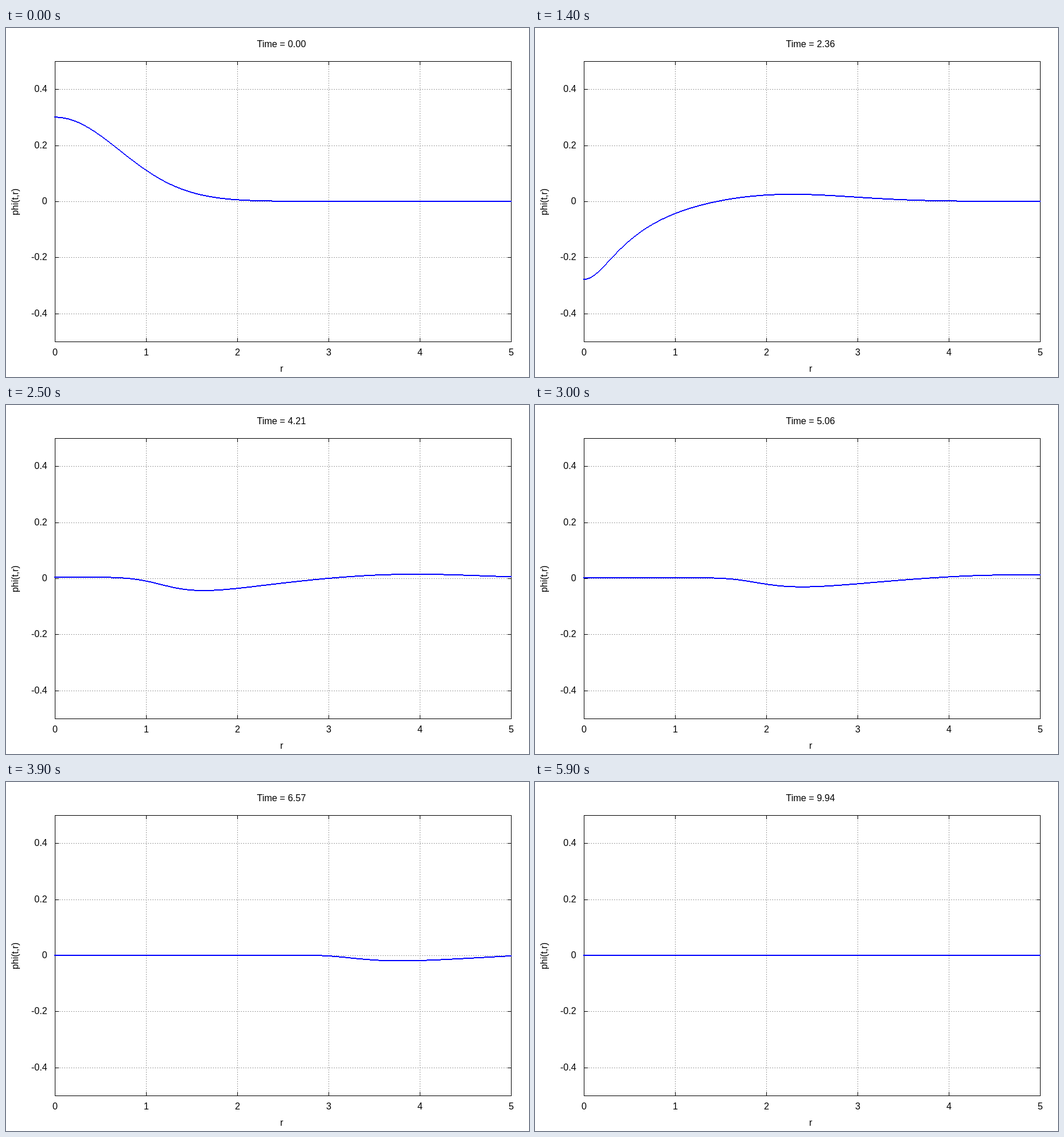
Write an HTML page with a canvas that moves like this. It is 900 by 600 pixels and loops after 6000 ms.

```html
<!DOCTYPE html>
<html lang="en">
<head>
<meta charset="utf-8">
<title>Scalar pulse</title>
<style>
  html, body { margin: 0; width: 100%; height: 100%; overflow: hidden; background: #fff; }
  canvas { display: block; }
</style>
</head>
<body>
<canvas id="plot" width="900" height="600"></canvas>
<script>
// Self-gravitating spherical scalar field in polar-areal coordinates.
const N = 1000, DR = 0.01;
const FRAMES = 60, FRAME_MS = 100, FRAME_T = 0.168505, SUBSTEPS = 34;
const VISIBLE = 510;

const mass = new Float64Array(N + 1);
const source = new Float64Array(N);

// y holds phi in its first half and the momentum Pi in its second half.
function rates(y, out) {
  let left = 0;
  for (let i = 0; i < N; i++) {
    const r = (i + 0.5) * DR;
    const right = i < N - 1 ? (y[i + 1] - y[i]) / DR : 0;
    const slope = (left + right) / 2, pi = y[N + i];
    const k = 2 * Math.PI * r * DR * (slope * slope + pi * pi);
    source[i] = k;
    mass[i + 1] = (mass[i] * (1 - k) + k * r) / (1 + k);
    left = right;
  }
  let outerE = 1, outerFlux = 0;
  for (let i = N - 1; i >= 0; i--) {
    const e = outerE * Math.exp(-2 * source[i]);
    const r = (i + 0.5) * DR;
    const speed = (e + outerE) / 2 * (1 - (mass[i] + mass[i + 1]) / r);
    const flux = i ? i * i * e * (1 - 2 * mass[i] / (i * DR)) * (y[i] - y[i - 1]) : 0;
    out[i] = speed * y[N + i];
    out[N + i] = 3 * (outerFlux - flux) / (DR * DR * (3 * i * (i + 1) + 1));
    outerE = e;
    outerFlux = flux;
  }
}

function evolve() {
  const make = () => new Float64Array(2 * N);
  const y = make(), trial = make(), sum = make(), k = make();
  const h = FRAME_T / SUBSTEPS;
  const weight = [1, 2, 2, 1], reach = [0.5, 0.5, 1, 0];
  for (let i = 0; i < N; i++) y[i] = 0.3 * Math.exp(-(((i + 0.5) * DR) ** 2));

  const curves = [y.slice(0, VISIBLE)];
  while (curves.length < FRAMES) {
    for (let s = 0; s < SUBSTEPS; s++) {
      trial.set(y);
      sum.fill(0);
      for (let stage = 0; stage < 4; stage++) {
        rates(trial, k);
        const w = weight[stage], a = reach[stage] * h;
        for (let j = 0; j < 2 * N; j++) {
          sum[j] += w * k[j];
          trial[j] = y[j] + a * k[j];
        }
      }
      for (let j = 0; j < 2 * N; j++) y[j] += h / 6 * sum[j];
    }
    curves.push(y.slice(0, VISIBLE));
  }
  return curves;
}

const LEFT = 84, RIGHT = 869, TOP = 57, BOTTOM = 539;
const xOf = r => Math.round(LEFT + 157 * r);
const yOf = v => Math.round(298 - 482 * v);
const ctx = document.getElementById("plot").getContext("2d");

function rect(x, y, w, h, color) {
  ctx.fillStyle = color;
  ctx.fillRect(x, y, w, h);
}

function text(str, x, y, align) {
  ctx.fillStyle = "#000";
  ctx.textAlign = align;
  ctx.fillText(str, x, y);
}

function drawAxes() {
  const gray = "#a0a0a0", black = "#000";
  const values = [-0.4, -0.2, 0, 0.2, 0.4];
  for (const v of values) {
    for (let x = LEFT; x < RIGHT; x += 4) rect(x, yOf(v), 2, 1, gray);
  }
  for (let r = 1; r < 5; r++) {
    for (let y = BOTTOM; y > TOP; y -= 4) rect(xOf(r), y - 1, 1, 2, gray);
  }
  for (const v of values) {
    const y = yOf(v);
    rect(LEFT, y, 7, 1, black);
    rect(RIGHT - 6, y, 7, 1, black);
    text(String(v), 71, y + 5, "right");
  }
  for (let r = 0; r <= 5; r++) {
    const x = xOf(r);
    rect(x, TOP, 1, 7, black);
    rect(x, BOTTOM - 6, 1, 7, black);
    text(String(r), x + 0.5, 563, "center");
  }
  rect(LEFT, TOP, RIGHT - LEFT + 1, 1, black);
  rect(LEFT, BOTTOM, RIGHT - LEFT + 1, 1, black);
  rect(LEFT, TOP, 1, BOTTOM - TOP + 1, black);
  rect(RIGHT, TOP, 1, BOTTOM - TOP + 1, black);

  text("r", 474.5, 591, "center");
  ctx.save();
  ctx.translate(21, 299);
  ctx.rotate(-Math.PI / 2);
  text("phi(t,r)", 0, 0, "center");
  ctx.restore();
}

function drawCurve(phi) {
  let last = null;
  for (let x = LEFT - 1; x <= RIGHT; x++) {
    const u = Math.max(0, (x - LEFT) / 157 / DR - 0.5), i = Math.floor(u);
    const y = yOf(phi[i] + (u - i) * (phi[i + 1] - phi[i]));
    // Close the gap to the previous column where the curve is steep.
    let top = y, end = y;
    if (last !== null && last < y - 1) top = last + 1;
    if (last !== null && last > y + 1) end = last - 1;
    rect(x, top - 1, 1, end - top + 2, "#00f");
    last = y;
  }
}

const curves = evolve();

function draw(n) {
  rect(0, 0, 900, 600, "#fff");
  ctx.font = '16px "Liberation Sans", Arial, sans-serif';
  drawAxes();
  text("Time = " + (n * FRAME_T).toFixed(2), 431.7, 33, "left");
  drawCurve(curves[n]);
}

let start = null, shown = 0;
draw(0);

function tick(now) {
  if (start === null) start = now;
  const n = Math.floor((now - start) / FRAME_MS) % FRAMES;
  if (n !== shown) draw(shown = n);
  requestAnimationFrame(tick);
}
requestAnimationFrame(tick);
</script>
</body>
</html>
```
